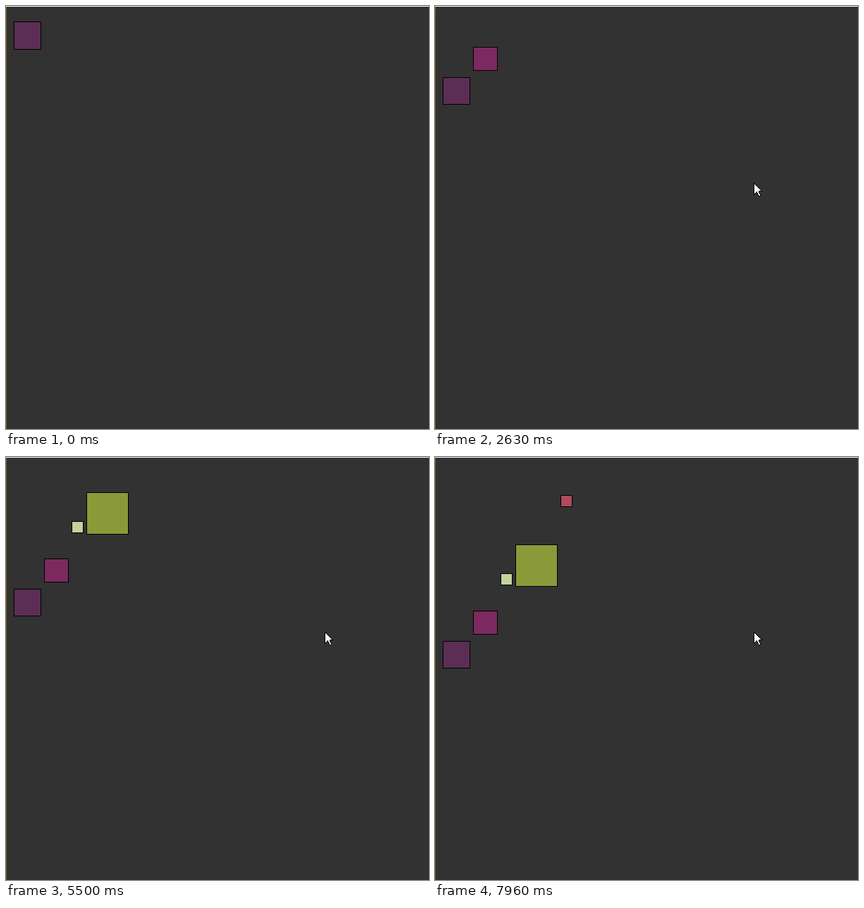
An HTML page with a canvas for the animation above (8000 ms loop, 600 by 600 pixels).

```html
<!DOCTYPE html>
<html>
<head>
<meta charset="utf-8">
<style>
  html, body { margin: 0; width: 100%; height: 100%; overflow: hidden; background: #323232; }
  canvas { display: block; }
</style>
</head>
<body>
<canvas id="stage" width="600" height="600"></canvas>
<script>
const ctx = document.getElementById('stage').getContext('2d');
const LOOP = 8000;
const TICKS_PER_MS = .03;
const SPEED = .998;      // pixels per tick
const ENTRY_Y = 11;      // squares stay hidden above this line
const ENTRANCE_END = 500;

// rise: height above the first square
const squares = [
  { x: 11, size: 38.5, rise: 0, color: '#5c2e55' },
  { x: 54.5, size: 33.5, rise: 43, color: '#7c2960' },
  { x: 93, size: 16, rise: 96, color: '#c4d39c' },
  { x: 114.5, size: 58.5, rise: 136.5, color: '#8b9a39' },
  { x: 178, size: 16, rise: 207, color: '#b24a5c' }
];

function rect(x, y, w, h, color) {
  ctx.fillStyle = color;
  ctx.fillRect(x, y, w, h);
}

function drawBackground() {
  rect(0, 0, 600, 600, '#323232');
  rect(0, 0, 1, 600, '#6f5b00');
  rect(0, 0, 600, 1, '#fff');
}

// Edges snap to whole pixels, each on its own
function drawSquare({ x, size, color }, y) {
  const left = Math.floor(x), top = Math.floor(y);
  const w = Math.floor(x + size) - left;
  const h = Math.floor(y + size) - top;
  rect(left, top, w + 1, h + 1, '#000');
  rect(left + 1, top + 1, w - 1, h - 1, color);
}

// The pointer slides in, then drifts slowly up and left
function pointerAt(time) {
  const seconds = time / 1000;
  const x = Math.min(453, Math.max(452, 453.8 - seconds));
  const y = Math.min(251, Math.max(248, 253.6 - seconds));
  const left = Math.max(0, 1 - time / ENTRANCE_END) ** 3;
  return [Math.round(x + 119 * left), Math.round(y + 40 * left)];
}

function drawPointer(x, y) {
  const outlinedRow = (column, row, width) => {
    rect(x + column - 1, y + row, width + 2, 1, '#000');
    if (width > 0) rect(x + column, y + row, width, 1, '#fff');
  };
  rect(x, y + 11, 12, 1, '#000');
  for (let row = 0; row <= 16; row++) outlinedRow(1, row, row < 11 ? row - 1 : 15 - row);
  for (let row = 12; row <= 17; row++) outlinedRow(Math.floor(row / 2) - 1, row, 2);
  rect(x + 1, y + 11, 6, 1, '#fff');
  rect(x + 7, y + 18, 2, 1, '#000');
}

function draw(time) {
  const tick = Math.floor((time + 9) * TICKS_PER_MS);
  const fall = 22.6 + tick * SPEED;
  drawBackground();
  for (const square of squares) {
    const y = fall - square.rise;
    if (y >= ENTRY_Y) drawSquare(square, y);
  }
  if (tick > 0) drawPointer(...pointerAt(time));
}

function loop() {
  draw(performance.now() % LOOP);
  requestAnimationFrame(loop);
}
loop();
</script>
</body>
</html>
```
